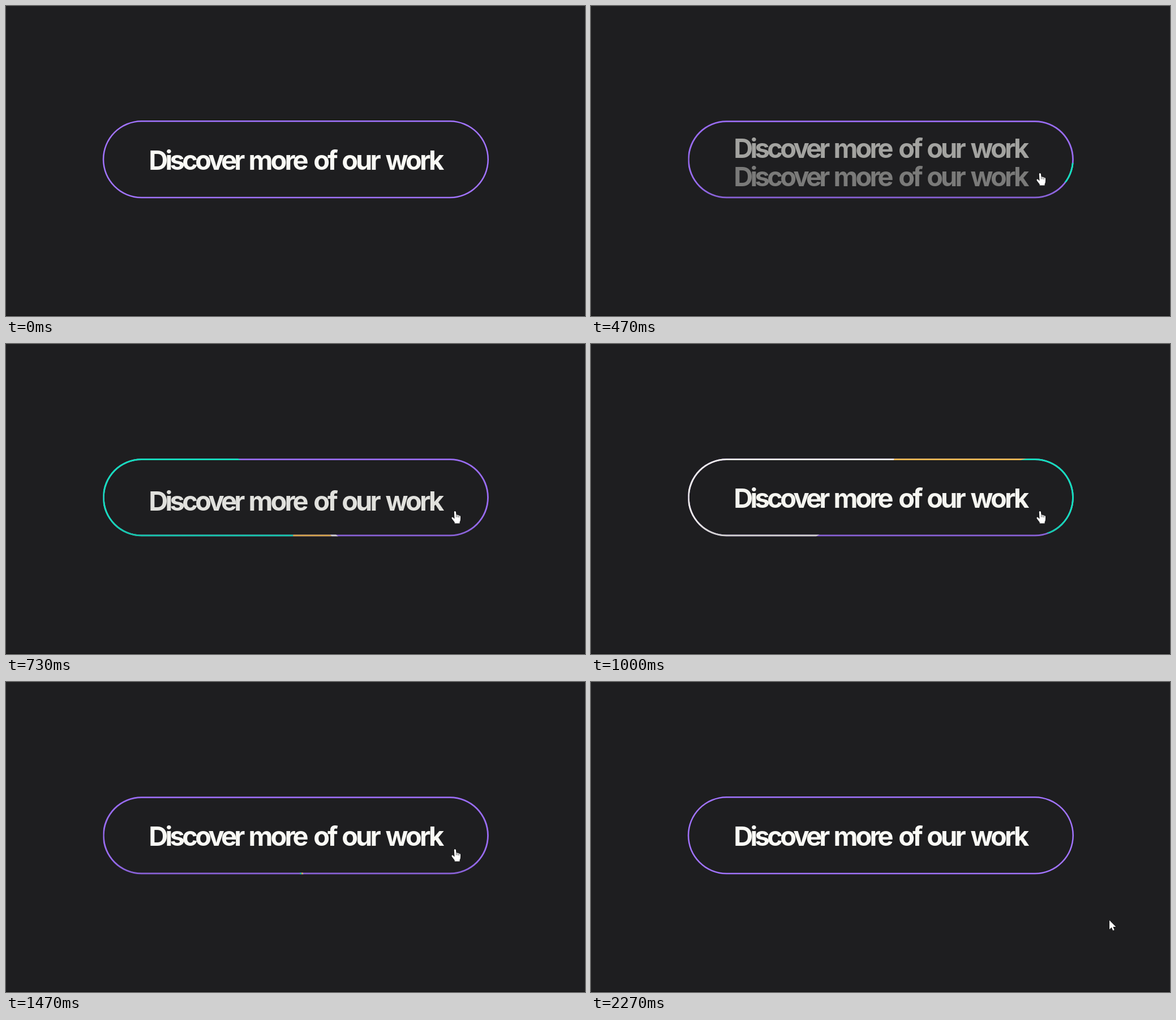
An HTML page with a canvas for the animation above (2590 ms loop, 1023 px wide and 547 px high).

```html
<!DOCTYPE html>
<html lang="en">
<head>
<meta charset="utf-8">
<title>Button hover</title>
<style>
  html, body { margin: 0; width: 100%; height: 100%; overflow: hidden; background: #1e1e20; }
  canvas, svg { position: absolute; left: 0; top: 0; width: 1023px; height: 547px; }
  text { font: 700 47px Inter, "Open Sans", sans-serif; letter-spacing: -3.9px; fill: #fafaf5; }
  .tight { letter-spacing: -4.7px; }
  .cursor path { fill: #fff; stroke: #111; stroke-width: .9; stroke-linejoin: round; paint-order: stroke; }
  .cursor .knuckles { fill: none; stroke: #333; stroke-width: .8; }
</style>
</head>
<body>
<canvas id="ring" width="1023" height="547"></canvas>
<svg viewBox="0 0 1023 547">
  <defs>
    <text id="words" y="288.5"><tspan class="tight" x="252.3">Discover</tspan> <tspan x="428.6">more</tspan> <tspan x="543.2">of</tspan> <tspan x="593.2">our</tspan> <tspan x="670.6">work</tspan></text>
  </defs>
  <rect y="546" width="1023" height="1" fill="#111112"/>
  <use id="label" href="#words"/>
  <use id="nextLabel" href="#words"/>
  <g id="cursor" class="cursor">
    <path id="arrow" d="M0 0V16L3.7 12.6L6.2 18L8.7 16.9L6.3 11.6H11.3Z"/>
    <g id="hand">
      <path d="M-1.7 1.4Q-1.5 0 -.2 0Q1.2 0 1.4 1.5L2 6.5Q3.4 5.8 4.4 7.1Q5.8 6.4 6.8 7.8Q9.3 7.3 9.5 9.7V14Q9.5 16.8 8.1 19V21.6H-.8V19.4L-5.6 13.2Q-6.7 11.3-5.4 10.7Q-4.3 10.3-3 11.7L-1 13.4Z"/>
      <path class="knuckles" d="M2 6.5V10.5M4.5 7.2V10.8M6.9 7.9V11.2"/>
    </g>
  </g>
</svg>
<script>
const LOOP = 2590, STEP = 200 / 3;
const HOVER = 385, RING_ON = 400, RING_OFF = 1670, LEAVE = 2000;
const PURPLE = '#a274ff', CX = 512, CY = 271;
const $ = id => document.getElementById(id);
const ctx = $('ring').getContext('2d');

const clamp = (v, lo = 0, hi = 1) => Math.min(hi, Math.max(lo, v));
const smooth = u => { u = clamp(u); return u * u * (3 - 2 * u); };
const mix = (a, b, u) => a + (b - a) * u;

// Leading edge of each colour, in degrees clockwise from the right.
const times = [400, 470, 730, 1000, 1200, 1400, 1600];
const sweeps = [
  { color: '#10e2ba', deg: [0, 7, 214, 372, 416, 438, 450] },
  { color: '#efb94c', deg: [0, 1, 94, 345, 406, 434, 450] },
  { color: '#eeeee6', deg: [0, 1, 47, 289, 391, 430, 450] },
  { color: '#996cf2', deg: [0, 1, 42.5, 149, 362, 428, 450] }
];

// Monotone cubic through the key angles.
function edgeAt(deg, t) {
  const last = times.length - 1;
  if (t <= times[0]) return deg[0];
  if (t >= times[last]) return deg[last];
  const rate = i => (deg[i + 1] - deg[i]) / (times[i + 1] - times[i]);
  const slope = i => {
    if (i === 0 || i === last) return 0;
    const a = rate(i - 1), b = rate(i);
    return a * b > 0 ? 2 * a * b / (a + b) : 0;
  };
  const i = times.findIndex((x, n) => t < times[n + 1]);
  const h = times[i + 1] - times[i], u = (t - times[i]) / h, v = 1 - u;
  return v * v * (1 + 2 * u) * deg[i] + u * u * (1 + 2 * v) * deg[i + 1]
    + h * u * v * (v * slope(i) - u * slope(i + 1));
}

function pillPath(left, top, right, bottom) {
  ctx.roundRect(left, top, right - left, bottom - top, (bottom - top) / 2);
}

function plainRing(alpha) {
  ctx.globalAlpha = alpha;
  ctx.fillStyle = PURPLE;
  ctx.beginPath();
  pillPath(170.8, 202.1, 853, 339.2);
  pillPath(173.3, 204.6, 850.5, 336.7);
  ctx.fill('evenodd');
}

function colourRing(t, alpha) {
  ctx.save();
  ctx.globalAlpha = alpha;
  ctx.beginPath();
  ctx.rect(171.5, 0, 800, 547);
  ctx.clip();
  ctx.beginPath();
  pillPath(170.9, 202.3, 852.9, 339.3);
  pillPath(173.7, 205.1, 850.1, 336.5);
  ctx.clip('evenodd');
  ctx.fillStyle = sweeps[3].color;
  ctx.fillRect(160, 190, 710, 160);
  const edges = sweeps.map(s => edgeAt(s.deg, t) * Math.PI / 180);
  for (let i = 0; i < 3; i++) {
    if (edges[i] - edges[i + 1] < 1e-4) continue;
    ctx.fillStyle = sweeps[i].color;
    ctx.beginPath();
    ctx.moveTo(CX, CY);
    ctx.arc(CX, CY, 400, edges[i + 1], edges[i]);
    ctx.fill();
  }
  // The lower edge is a little dimmer.
  const shade = ctx.createLinearGradient(0, 310, 0, 338);
  shade.addColorStop(0, 'rgba(30,30,32,0)');
  shade.addColorStop(1, 'rgba(30,30,32,.14)');
  ctx.fillStyle = shade;
  ctx.fillRect(160, 310, 710, 40);
  ctx.restore();
}

function drawRing(t) {
  ctx.clearRect(0, 0, 1023, 547);
  const plain = t < RING_ON ? 1 : clamp((t - RING_OFF + 60) / 190);
  if (plain < 1) colourRing(t, 1 - plain);
  if (plain > 0) plainRing(plain);
  ctx.globalAlpha = 1;
}

function place(el, dy, opacity) {
  el.setAttribute('transform', `translate(0 ${dy.toFixed(2)})`);
  el.setAttribute('opacity', opacity.toFixed(3));
}

function drawLabels(t) {
  const p = t < HOVER ? 0 : t > 1600 ? 1 : 1 - Math.exp(-(t - HOVER) * .0064);
  place($('label'), -50 * p, 1 - clamp(p / .75) ** 1.6);
  place($('nextLabel'), 50 * (1 - p), p);
}

function drawCursor(t) {
  const enter = smooth((t - 70) / 400), leave = smooth((t - LEAVE + 67) / 337);
  const x = mix(mix(994, 793.5, enter), 916, leave);
  const y = mix(mix(357, 295, enter), 420.5, leave);
  const over = t >= HOVER && leave < .35;
  $('cursor').setAttribute('transform', `translate(${x.toFixed(2)} ${y.toFixed(2)})`);
  $('cursor').style.display = t < 65 ? 'none' : '';
  $('hand').style.display = over ? '' : 'none';
  $('arrow').style.display = over ? 'none' : '';
}

function render(now) {
  // Motion advances fifteen times a second.
  const step = Math.min(34, Math.floor((now % LOOP + 4) / STEP));
  const t = Math.round(step * STEP / 10) * 10;
  drawRing(t);
  drawLabels(t);
  drawCursor(t);
}

const start = performance.now();
function tick() {
  render(performance.now() - start);
  requestAnimationFrame(tick);
}
tick();
</script>
</body>
</html>
```
